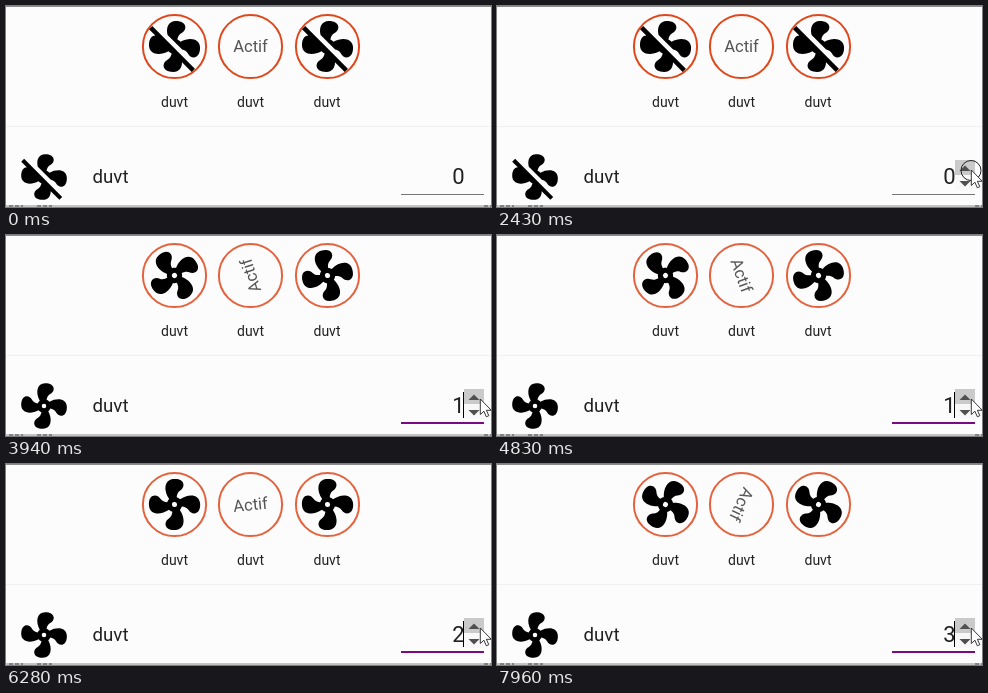
Write an HTML page that moves like this. It is 485 px wide and 201 px high and loops after 7990 ms.

```html
<!DOCTYPE html>
<html>
<head>
<meta charset="utf-8">
<style>
  html, body { margin: 0; width: 100%; height: 100%; overflow: hidden; background: #fcfcfc; }
  svg { display: block; font-family: Roboto, sans-serif; }
  .ring { fill: none; stroke: #e0481c; stroke-width: 2; }
  .label { font-size: 14px; fill: #212121; text-anchor: middle; }
</style>
</head>
<body>
<svg width="485" height="201" viewBox="0 0 485 201">
  <defs>
    <path id="fan" fill-rule="evenodd" transform="translate(-12 -12)" d="M12,11A1,1 0 0,0 11,12A1,1 0 0,0 12,13A1,1 0 0,0 13,12A1,1 0 0,0 12,11M12.5,2C17,2 17.11,5.57 14.75,6.75C13.76,7.24 13.32,8.29 13.13,9.22C13.61,9.42 14.03,9.73 14.35,10.13C18.05,8.13 22.03,8.92 22.03,12.5C22.03,17 18.46,17.1 17.28,14.73C16.78,13.74 15.72,13.3 14.79,13.11C14.59,13.59 14.28,14 13.88,14.34C15.87,18.03 15.08,22 11.5,22C7,22 6.91,18.42 9.27,17.24C10.25,16.75 10.69,15.71 10.89,14.79C10.4,14.59 9.97,14.27 9.65,13.87C5.96,15.85 2,15.07 2,11.5C2,7 5.56,6.89 6.74,9.26C7.24,10.25 8.29,10.68 9.22,10.87C9.41,10.39 9.73,9.97 10.14,9.65C8.15,5.96 8.94,2 12.5,2Z"/>
    <path id="fan-off" transform="translate(-12 -12)" d="M12.5,2C9.64,2 8.57,4.55 9.29,7.47L15,13.16C15.87,13.37 16.81,13.81 17.28,14.73C18.46,17.1 22.03,17 22.03,12.5C22.03,8.92 18.05,8.13 14.35,10.13C14.03,9.73 13.61,9.42 13.13,9.22C13.32,8.29 13.76,7.24 14.75,6.75C17.11,5.57 17,2 12.5,2M3.28,4L2,5.27L4.47,7.73C3.22,7.74 2,8.87 2,11.5C2,15.07 5.96,15.85 9.65,13.87C9.97,14.27 10.4,14.59 10.89,14.79C10.69,15.71 10.25,16.75 9.27,17.24C6.91,18.42 7,22 11.5,22C13.8,22 14.94,20.36 14.94,18.21L18.73,22L20,20.72L3.28,4Z"/>
  </defs>
  <rect width="485" height="201" fill="#fcfcfc"/>
  <path d="M0 120.5H485" stroke="#f0f0f0"/>
  <path d="M0 .5H485M0 200H485" stroke="#8a8a8a"/>
  <path d="M3 200H17M31 200H46M478 200H485" stroke="#444" stroke-dasharray="4 2"/>

  <g id="rings">
    <circle class="ring" cx="168.5" cy="40.5" r="31.6"/>
    <circle class="ring" cx="244.5" cy="40.5" r="31.6"/>
    <circle class="ring" cx="321.5" cy="40.5" r="31.6"/>
  </g>
  <g transform="translate(168.5 40.5) scale(2.55)"><use id="left" class="icon"/></g>
  <g transform="translate(244.5 40.5)">
    <text id="middle" y="5.8" text-anchor="middle" font-size="16.6" fill="#555">Actif</text>
  </g>
  <g transform="translate(321.5 40.5) scale(2.55)"><use id="right" class="icon"/></g>
  <text class="label" x="168.5" y="101">duvt</text>
  <text class="label" x="244.5" y="101">duvt</text>
  <text class="label" x="321" y="101">duvt</text>

  <g transform="translate(38 171) scale(2.28)"><use class="icon"/></g>
  <text x="86.5" y="177" font-size="18.7" fill="#212121">duvt</text>
  <text id="value" x="458.5" y="178" text-anchor="end" font-size="22" fill="#212121">0</text>
  <path d="M395 188.5H478" stroke="#777"/>
  <rect id="focus" y="187" height="2" fill="#7b0a82"/>
  <g id="spinner">
    <rect x="458" y="154" width="20" height="30" fill="#f8f8f8"/>
    <rect x="458" y="154" width="20" height="15" fill="#cacaca"/>
    <path d="M462.5 165L468 159.5L473.5 165ZM462.5 175L468 180.5L473.5 175Z" fill="#505050"/>
  </g>
  <rect id="caret" x="457" y="157" width="1" height="26"/>
  <circle id="click" cx="474" cy="164.5" r="10" fill="none" stroke="#222"/>
  <path id="pointer" d="M0 0V15.5L3.6 12.2L6 17.8L8.5 16.7L6.1 11.3H11Z" fill="#fff" stroke="#222" stroke-width=".9"/>
</svg>
<script>
  const LOOP = 7990;
  const TURN = 1800; // one rotation at value 1, divided by the value
  // Each press edits the value; the buttons react a little later.
  const steps = [
    { press: 2430, edit: 2560, react: 2680, leftDelay: 110 },
    { press: 5095, edit: 5100, react: 5395, leftDelay: 0 },
    { press: 7490, edit: 7495, react: 7768, leftDelay: 0 }
  ];
  const $ = id => document.getElementById(id);
  const icons = document.querySelectorAll('.icon');
  const show = (node, on) => node.setAttribute('visibility', on ? 'visible' : 'hidden');
  const progress = (t, from, to) => Math.min(1, Math.max(0, (t - from) / (to - from)));
  const ease = p => p * p * (3 - 2 * p);
  const mix = (a, b, p) => a + (b - a) * p;

  function pointerAt(t) {
    const enter = ease(progress(t, 590, 1395));
    const settle = ease(progress(t, 1395, 1720));
    return [mix(mix(272, 461, enter), 474.3, settle), mix(mix(197, 156, enter), 164, settle)];
  }

  function spin(id, elapsed, value) {
    const angle = Math.max(0, elapsed) * value / TURN * 360 % 360;
    $(id).setAttribute('transform', `rotate(${angle})`);
  }

  function draw(t) {
    const value = steps.filter(s => t >= s.edit).length;
    const speed = steps.filter(s => t >= s.react).length;
    const running = speed > 0;
    const { react, leftDelay } = running ? steps[speed - 1] : { react: t, leftDelay: 0 };

    spin('left', t - react - leftDelay, speed);
    spin('middle', t - react, speed);
    spin('right', t - react, speed);
    icons.forEach(node => node.setAttribute('href', running ? '#fan' : '#fan-off'));
    $('rings').setAttribute('opacity', running ? 0.85 : 1);

    $('value').textContent = value;
    show($('caret'), value > 0 && (t - steps[value - 1].edit) % 1000 < 500);
    const width = 83 * ease(progress(t, 2560, 2760));
    $('focus').setAttribute('x', 436.5 - width / 2);
    $('focus').setAttribute('width', width);

    show($('spinner'), t >= 1410);
    show($('click'), steps.some(s => t >= s.press && t < s.press + 160));
    show($('pointer'), t >= 590);
    $('pointer').setAttribute('transform', `translate(${pointerAt(t)})`);
  }

  const start = performance.now();
  function frame() {
    draw((performance.now() - start) % LOOP);
    requestAnimationFrame(frame);
  }
  frame();
</script>
</body>
</html>
```
